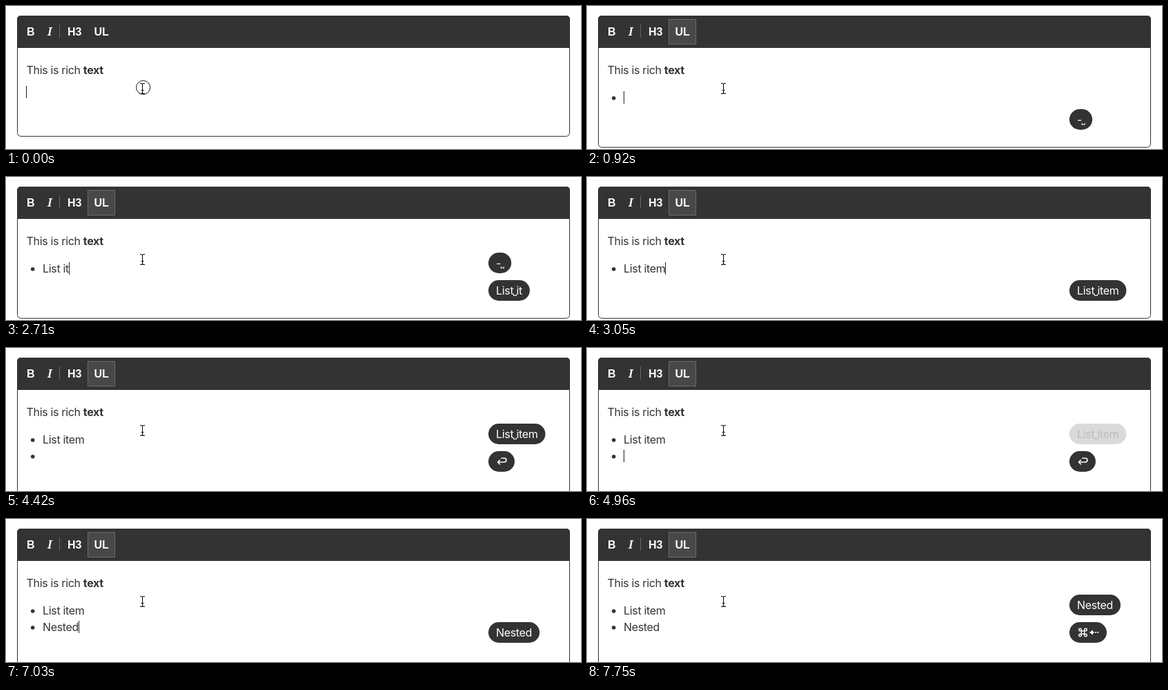
These frames come from a looping animation (832x208 px, 7.99 s). An HTML page with a canvas:

```html
<!DOCTYPE html>
<html lang="en">
<head>
<meta charset="utf-8">
<title>Rich text editor</title>
<style>
  html, body { margin: 0; width: 832px; height: 208px; overflow: hidden; background: #fff; }
  canvas { display: block; }
</style>
</head>
<body>
<canvas id="stage" width="832" height="208"></canvas>
<script>
const ctx = document.getElementById('stage').getContext('2d');
const LOOP = 7990;
const INK = '#333';
const BODY_FONT = '16px Inter, sans-serif';
const BOLD_FONT = 'bold 16px Inter, sans-serif';
const TOOL_FONT = 'bold 16px "Liberation Sans", sans-serif';

// Each group of keystrokes shares one pill; times are per character.
const groups = [
  { text: '- ', times: [740, 920] },
  { text: 'List item', times: [1930, 2110, 2230, 2350, 2470, 2590, 2700, 2770, 2880] },
  { icon: 'enter', times: [3950] },
  { text: 'Nested', times: [5140, 5320, 5500, 5730, 5850, 6020] },
  { icon: 'home', times: [7210] },
];
const [dash, item, enter, nested, home] = groups;
const LIST_START = dash.times[1];
// Moments at which the caret is lit again and its blink restarts.
const blinkResets = [-320, ...groups.slice(0, 4).flatMap(g => g.times), 7280];

const typed = (group, t) => group.text.slice(0, group.times.filter(k => k <= t).length);

function setText(font) {
  ctx.font = font;
  ctx.letterSpacing = font === TOOL_FONT ? '0px' : '-0.33px';
}

function textWidth(str, font = BODY_FONT) {
  setText(font);
  return ctx.measureText(str).width;
}

function label(str, x, y, font = BODY_FONT, color = INK) {
  setText(font);
  ctx.fillStyle = color;
  ctx.fillText(str, x, y);
}

function roundRect(x, y, w, h, r) {
  ctx.beginPath();
  ctx.roundRect(x, y, w, h, r);
}

function strokePath(d, color, width, x = 0, y = 0) {
  ctx.save();
  ctx.translate(x, y);
  ctx.strokeStyle = color;
  ctx.lineWidth = width;
  ctx.stroke(new Path2D(d));
  ctx.restore();
}

function drawToolbar(listActive) {
  ctx.fillStyle = INK;
  roundRect(16, 14, 800, 47, [5, 5, 0, 0]);
  ctx.fill();
  if (listActive) {
    ctx.fillStyle = '#484848';
    ctx.fillRect(118, 19, 40, 37);
    strokePath('M118.5 19.5h39v36h-39z', '#6c6c6c', 1);
  }
  label('B', 30, 43, TOOL_FONT, '#fff');
  label('I', 60, 43, 'italic bold 16px "Noto Serif", serif', '#fff');
  label('H3', 89, 43, TOOL_FONT, '#fff');
  label('UL', 127.5, 43, TOOL_FONT, '#fff');
  ctx.fillStyle = '#666';
  ctx.fillRect(77, 27, 1, 19);
}

function drawFrame(bottom) {
  ctx.strokeStyle = INK;
  ctx.lineWidth = 1;
  roundRect(16.5, 14.5, 799, bottom - 15, 5);
  ctx.stroke();
}

function bullet(y) {
  ctx.fillStyle = INK;
  ctx.beginPath();
  ctx.arc(38.7, y, 2.8, 0, 7);
  ctx.fill();
}

function drawCaret(t, x, top) {
  const reset = blinkResets.filter(k => k <= t).pop();
  const age = t - reset - 470;
  const lit = age < 0 || Math.floor(age / 540) % 2 === 1;
  if (!lit || t >= 7750) return;
  ctx.fillStyle = '#222';
  ctx.fillRect(Math.round(x), top, 1, 18);
}

function drawContent(t) {
  label('This is rich ', 29.5, 99);
  label('text', 29.5 + textWidth('This is rich '), 99, BOLD_FONT);

  if (t < LIST_START) {
    const str = typed(dash, t);
    label(str, 29.5, 131);
    drawCaret(t, 29 + textWidth(str), 116);
    return;
  }
  const first = typed(item, t);
  bullet(134);
  label(first, 53, 139);
  if (t < enter.times[0]) {
    drawCaret(t, 53 + textWidth(first), 124);
    return;
  }
  const second = typed(nested, t);
  bullet(158);
  label(second, 53, 163);
  drawCaret(t, 53 + (t < home.times[0] ? textWidth(second) : 0), 148);
}

function drawPointer(t) {
  strokePath('M194 112.5h1.5q2 0 2 2q0-2 2-2h1.5 M197.5 114v12 ' +
    'M194 127.5h1.5q2 0 2-2q0 2 2 2h1.5 M195.5 122.5h4', '#111', 1.1);
  if (t >= 150) return;
  ctx.globalAlpha = t < 60 ? 1 : 0.5;
  ctx.beginPath();
  ctx.arc(198.5, 118.5, 10, 0, 7);
  ctx.strokeStyle = '#111';
  ctx.lineWidth = 1;
  ctx.stroke();
  ctx.globalAlpha = 1;
}

function drawIcon(name, x, y, color) {
  ctx.lineCap = ctx.lineJoin = 'round';
  if (name === 'enter') {
    strokePath('M4.5-2L1.5 1L4.5 4 M1.8 1H11a2.8 2.8 0 0 0 0-5.8H7', color, 1.6, x, y);
  } else {
    const loops = [[-1, -1], [1, -1], [1, 1], [-1, 1]].map(([sx, sy]) =>
      `M${7.5 + sx * 2} ${sy * 2}h${sx * 2}a2 2 0 1 ${sx * sy > 0 ? 0 : 1} ${-sx * 2} ${-sy * 2 + sy * 0}z`);
    // Corner loops start on the square's corner and circle outwards.
    ctx.save();
    ctx.translate(x + 7.5, y);
    ctx.strokeStyle = color;
    ctx.lineWidth = 1.4;
    ctx.strokeRect(-2.2, -2.2, 4.4, 4.4);
    for (const sx of [-1, 1]) for (const sy of [-1, 1]) {
      ctx.beginPath();
      ctx.arc(sx * 4, sy * 4, 1.8, 0, 7);
      ctx.stroke();
    }
    ctx.restore();
    ctx.fillStyle = color;
    ctx.fill(new Path2D(`M${x + 17} ${y}l5-3.4v6.8z`));
    ctx.lineCap = 'butt';
    strokePath('M21 0h3 M25 0h2.2 M28.2 0h2.2', color, 1.5, x, y);
  }
  ctx.lineCap = 'butt';
  ctx.lineJoin = 'miter';
}

function drawSpaceMarks(str, x, baseline, color) {
  for (let i = str.indexOf(' '); i >= 0; i = str.indexOf(' ', i + 1)) {
    const left = x + textWidth(str.slice(0, i));
    strokePath('M0 -0.8v2.3h3.8v-2.3', color, 1.1, left + 0.3, baseline);
  }
}

function drawPill(group, t, top, alpha) {
  if (alpha === 0) return;
  const str = group.icon ? '' : typed(group, t);
  const width = group.icon
    ? { enter: 38, home: 54 }[group.icon]
    : Math.max(30, textWidth(str) + 22);
  const shade = Math.round(51 + 204 * alpha * alpha);
  const color = `rgb(${shade},${shade},${shade})`;

  ctx.globalAlpha = alpha;
  ctx.fillStyle = INK;
  roundRect(698, top, width, 30, 15);
  ctx.fill();
  if (group.icon) {
    drawIcon(group.icon, 710, top + 15, color);
  } else {
    label(str, 709, top + 21, BODY_FONT, color);
    drawSpaceMarks(str, 709, top + 21, color);
  }
  ctx.globalAlpha = 1;
}

function fade(age) {
  if (age < 1960) return 1;
  if (age < 2020) return 0.95;
  if (age < 2070) return 0.6;
  return age < 2130 ? 0.18 : 0;
}

function drawPills(t) {
  const current = groups.filter(g => g.times[0] <= t).length - 1;
  if (current < 0) return;
  drawPill(groups[current], t, 150, 1);
  const previous = groups[current - 1];
  if (previous) drawPill(previous, t, 110, fade(t - previous.times.at(-1)));
}

function draw(t) {
  ctx.fillStyle = '#fff';
  ctx.fillRect(0, 0, 832, 208);
  drawFrame(t < LIST_START ? 190 : t < enter.times[0] ? 206 : 230);
  drawToolbar(t >= LIST_START);
  drawContent(t);
  drawPills(t);
  drawPointer(t);
}

const start = performance.now();
function tick() {
  draw((performance.now() - start) % LOOP);
  requestAnimationFrame(tick);
}
tick();
</script>
</body>
</html>
```
